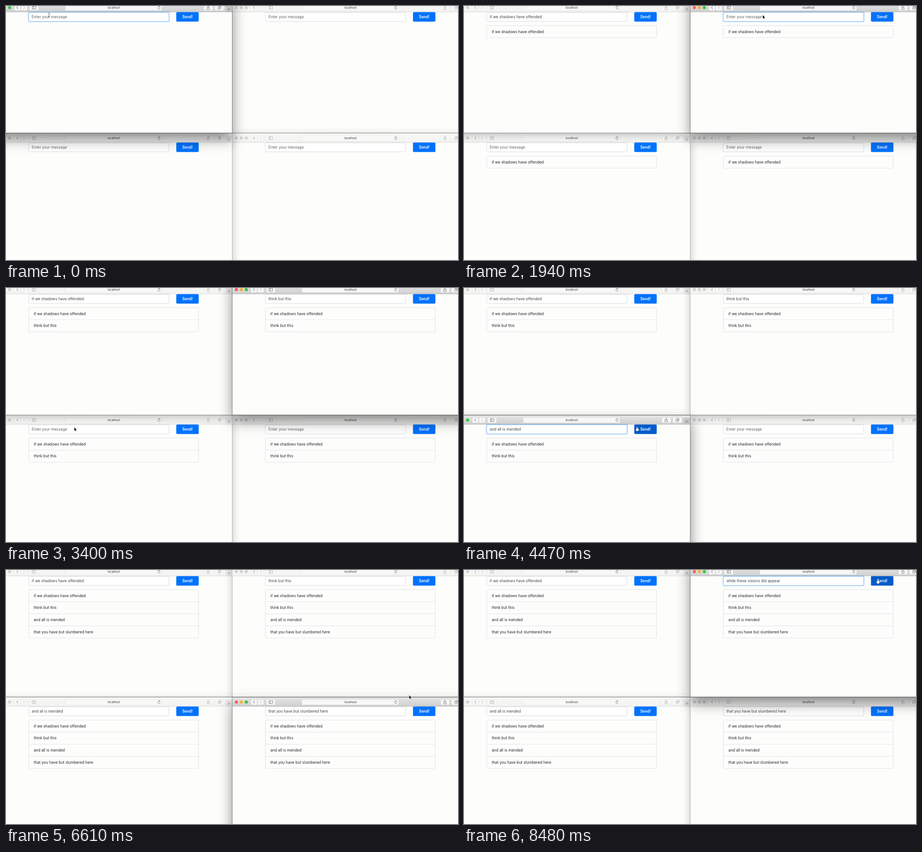
Recreate the animation shown at these times as an HTML page with a canvas. Size 998 by 561 pixels, loop 8520 ms.

```html
<!DOCTYPE html>
<html lang="en">
<head>
<meta charset="utf-8">
<title>Four chat windows</title>
<style>
html, body { margin: 0; width: 100%; height: 100%; overflow: hidden; background: #fdfdfc; }
canvas { display: block; width: 998px; height: 561px; }
</style>
</head>
<body>
<canvas id="stage" width="998" height="561"></canvas>
<script>
const LOOP = 8520, KEY_MS = 33;
const FONT = 'Inter, "Liberation Sans", sans-serif';
const PAGE = '#fdfdfc', RULE = '#dedfe1';
const COL = 522.6, ROW = 288;
const ctx = document.getElementById('stage').getContext('2d');

const TL = 0, TR = 1, BL = 2, BR = 3;
const firstOrder = [TR, BR, BL, TL];
const origin = w => ({ x: w % 2 * COL, y: (w >> 1) * ROW });

// Each step: click a field, type, move to the button, send
function makeStep(win, at, fieldX, pressX, pressY, text) {
  const { x, y } = origin(win), from = at + 130, to = from + text.length * KEY_MS;
  return {
    win, at, from, to, text, send: to + 400,
    field: { x: x + fieldX, y: y + 20 },
    press: { x: x + pressX, y: y + pressY }
  };
}

const steps = [
  makeStep(TL, 100, 95, 394, 30, 'if we shadows have offended'),
  makeStep(TR, 1900, 137, 400, 24, 'think but this'),
  makeStep(BL, 3450, 150, 382, 19, 'and all is mended'),
  makeStep(BR, 4870, 167, 392, 21, 'that you have but slumbered here'),
  makeStep(TR, 7050, 175, 391, 21, 'while these visions did appear')
];

const path = steps.flatMap(s => [
  { t: s.at - 40, ...s.field }, { t: s.to + 40, ...s.field },
  { t: s.send - 100, ...s.press }, { t: s.send + 50, ...s.press }
]);

function pointerAt(t) {
  const b = path.find(p => p.t > t), a = path[path.indexOf(b) - 1] || b;
  const k = a === b ? 0 : (t - a.t) / (b.t - a.t), e = k * k * (3 - 2 * k);
  return { x: a.x + (b.x - a.x) * e, y: a.y + (b.y - a.y) * e };
}

function stateAt(t) {
  const begun = steps.filter((s, i) => !i || t >= s.at), step = begun.at(-1);
  const values = ['', '', '', ''];
  let order = firstOrder, typed = 0;
  for (const s of begun) {
    order = [...order.filter(w => w !== s.win), s.win];
    typed = Math.max(0, Math.floor((t - s.from) / KEY_MS));
    if (typed) values[s.win] = s.text.slice(0, typed);
  }
  return {
    values, order,
    active: step.win,
    focus: t < step.send,
    typing: t > step.from && t < step.to + 40,
    selected: !typed,
    beam: typed > 0 || step === steps[0],
    list: begun.filter(s => t >= s.send).map(s => s.text)
  };
}

function box(x, y, w, h, r, fill, stroke, width = .9) {
  ctx.beginPath();
  ctx.roundRect(x, y, w, h, r);
  if (fill) { ctx.fillStyle = fill; ctx.fill(); }
  if (stroke) { ctx.strokeStyle = stroke; ctx.lineWidth = width; ctx.stroke(); }
}

// Strokes, and optionally fills, an SVG path moved to x, y
function shape(d, x, y, stroke, width = .8, fill) {
  const p = new Path2D(d);
  ctx.save();
  ctx.translate(x, y);
  ctx.strokeStyle = stroke;
  ctx.lineWidth = width;
  ctx.stroke(p);
  if (fill) { ctx.fillStyle = fill; ctx.fill(p); }
  ctx.restore();
}

function label(str, x, y, color, { size = 8.3, weight = 400, align = 'left' } = {}) {
  ctx.font = `${weight} ${size}px ${FONT}`;
  ctx.textAlign = align;
  ctx.fillStyle = color;
  ctx.fillText(str, x, y);
  return ctx.measureText(str).width;
}

function drawToolbar(active) {
  const grad = ctx.createLinearGradient(0, -7, 0, 13);
  grad.addColorStop(0, active ? '#e6e6e6' : '#f7f7f6');
  grad.addColorStop(1, active ? '#cfcfcf' : '#f3f3f2');
  ctx.fillStyle = grad;
  ctx.fillRect(-30, -7, 540, 20);
  shape('M-30 13H510', 0, 0, active ? '#b2b2b2' : '#d8d8d8', 1);

  ['#fc5b57', '#f3b32e', '#2bc840'].forEach((c, i) =>
    box(-17.4 + 11 * i, .2, 6.8, 6.8, 3.4, active ? c : '#d3d3d3'));

  const face = active ? '#f7f7f7' : '#f8f8f7', edge = active ? '#d0d0d0' : '#e6e6e6';
  const ink = active ? '#666' : '#a6a6a6';
  const key = (cx, w, fill = face) => box(cx - w / 2, -2.5, w, 12.5, 2, fill, edge, .7);
  key(25, 14);
  key(40, 14);
  [62, 446.7, 471].forEach(cx => key(cx, 20));
  key(237.5, 214);

  shape('M1.5 -3L-1.5 0L1.5 3', 25, 3.7, active ? '#555' : '#777', 1);
  shape('M-1.5 -3L1.5 0L-1.5 3', 40, 3.7, active ? '#aaa' : '#bbb', 1);
  shape('M-4 -3H4V3H-4ZM-1.2 -3V3', 62, 3.8, ink);
  shape('M2.2 -1.5A2.7 2.7 0 1 0 2.7 0M-.4 -4.2L1.6 -2.8L-.2 -1.4', 338, 4, '#666');
  shape('M-1.5 -2H-2.8V3H2.8V-2H1.5M0 .5V-5M-1.6 -3.3L0 -5L1.6 -3.3', 446.5, 4.6, ink);
  shape('M-3 -1.4H1.6V3.2H-3ZM-1 -1.4V-3.3H3.6V1.3H1.6', 471, 3.7, ink);
  label('localhost', 238, 4, '#333', { size: 6.3, align: 'center' });

  box(486, 0, 16, 13, 0, active ? '#c4c4c4' : '#e9e9e9', active ? '#b4b4b4' : '#dcdcdc', .7);
  shape('M-3 0H3M0 -3V3', 492.2, 7, active ? '#777' : '#999');
}

function drawForm(value, focused, hover, s) {
  if (focused) box(49.4, 13.4, 311.2, 21.2, 2.5, null, 'rgba(0,123,255,.25)', 2.2);
  box(50.2, 14.2, 309.6, 19.8, 2, '#fff', focused ? '#8fbff2' : '#d3d6da');
  if (focused && s.selected && value) {
    ctx.font = `400 8.3px ${FONT}`;
    ctx.fillStyle = '#a9cdf3';
    ctx.fillRect(56.5, 18, ctx.measureText(value).width + 1, 12);
  }
  const width = label(value || 'Enter your message', 56.8, 24.4, value ? '#3f4448' : '#5c6166');
  if (focused && s.typing && value) shape('M0 -5V5', 57.4 + width, 24.2, '#333');
  box(376, 13.5, 49.5, 21, 2.2, hover ? '#005bcc' : '#0072fc');
  label('Send!', 400.8, 24.4, '#fff', { weight: 600, align: 'center' });
}

function drawList(list) {
  if (!list.length) return;
  const rowH = 26.7;
  box(50.2, 43.4, 375, rowH * list.length, 2, PAGE, RULE);
  list.forEach((str, i) => {
    const y = 43.4 + rowH * i;
    if (i) shape('M0 0H375', 50.2, y, RULE, .9);
    label(str, 61.2, y + 13.7, '#212529');
  });
}

function over(p, w, left, width) {
  const o = origin(w), dx = p.x - o.x - left, dy = p.y - o.y - 14;
  return dx >= 0 && dx <= width && dy >= 0 && dy <= 20;
}
const overInput = (p, w) => over(p, w, 50, 310);
const overButton = (p, w) => over(p, w, 376, 49);

function drawWindow(w, s, p) {
  const o = origin(w), active = w === s.active;
  const frame = [o.x ? 499.5 : -40, o.y ? 281 : -20, 539.5, o.y ? 320 : 300.4];

  ctx.save();
  ctx.shadowColor = `rgba(0,0,0,${active ? .45 : .24})`;
  ctx.shadowBlur = active ? 28 : 18;
  ctx.shadowOffsetY = active ? 14 : 5;
  ctx.fillStyle = PAGE;
  ctx.fillRect(...frame);
  ctx.restore();

  ctx.save();
  ctx.beginPath();
  ctx.rect(...frame);
  ctx.clip();
  ctx.translate(o.x, o.y);
  drawToolbar(active);
  drawForm(s.values[w], active && s.focus, active && !s.typing && overButton(p, w), s);
  drawList(s.list);
  ctx.restore();
  box(...frame, 0, null, `rgba(0,0,0,${active ? .42 : .18})`, .8);
}

function drawPointer(s, p) {
  if (s.typing) return;
  if (overButton(p, s.active)) {
    shape('M-1 5.2V.8Q0 -.6 .9 .8V3L3.7 3.8V6.5L2.8 9H-1L-3.3 5.5Q-2.6 3.6 -1 5.2Z', p.x, p.y, '#222', .9, '#fff');
  } else if (s.beam && overInput(p, s.active)) {
    shape('M-1.7 -4.4L0 -3.6L1.7 -4.4M0 -3.6V3.6M-1.7 4.4L0 3.6L1.7 4.4', p.x, p.y, '#444', .9);
  } else {
    shape('M0 0V7.6L1.7 6.1L2.9 8.8L4 8.3L2.8 5.7L5.2 5.5Z', p.x, p.y, '#fff', 1.2, '#111');
  }
}

function draw(t) {
  const s = stateAt(t), p = pointerAt(t);
  ctx.textBaseline = 'middle';
  s.order.forEach(w => drawWindow(w, s, p));
  drawPointer(s, p);
}

const start = performance.now();
function tick() {
  draw((performance.now() - start) % LOOP);
  requestAnimationFrame(tick);
}
tick();
</script>
</body>
</html>
```
